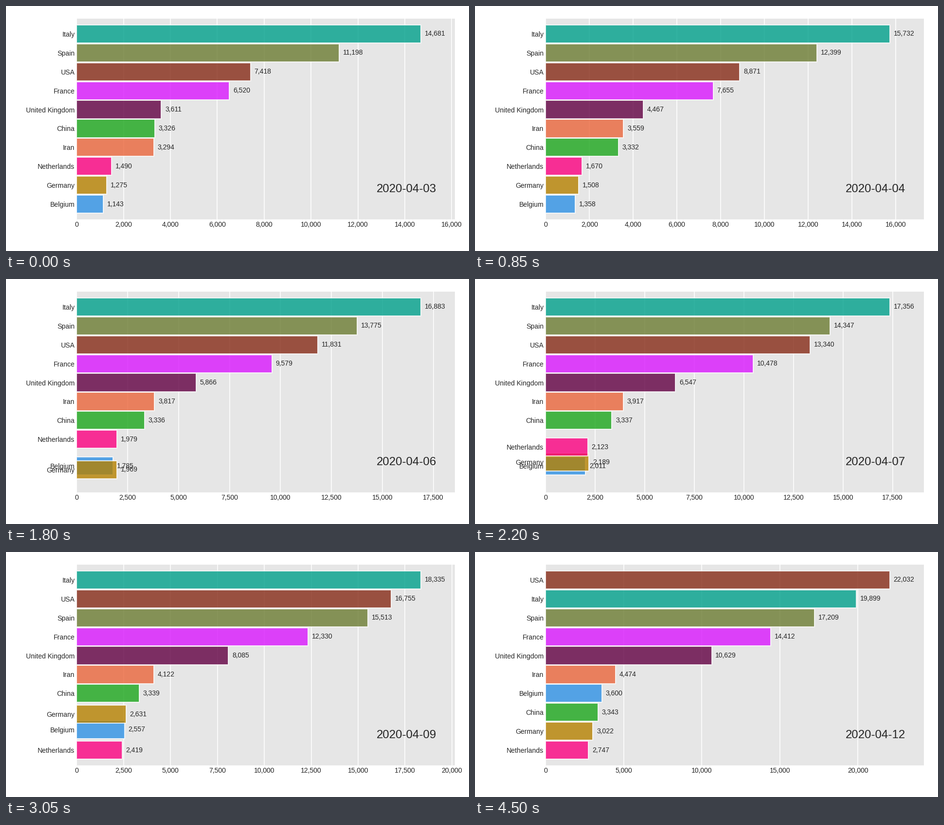
Animation of 952 by 504 pixels, one loop 4.55 s. Source, as a matplotlib script:

```python
import numpy as np
import matplotlib.pyplot as plt
from matplotlib.animation import FuncAnimation
from matplotlib.ticker import StrMethodFormatter

W, H, DPI = 952, 504, 144
LEFT, RIGHT, TOP, BOTTOM = 145.29, 923.45, 25.9, 439.1
STEPS, INTERVAL = 10, 50
DAYS, FIRST_DAY = 9, 3

# name: (colour, total every third day); listed in drawing order
KEY_DAYS = [0, 3, 6, 9]
COUNTRIES = {
    "Belgium": ("#2E91E5", [1143, 1632, 2523, 3600]),
    "China": ("#1CA71C", [3326, 3335, 3339, 3343]),
    "France": ("#DA16FF", [6520, 8926, 12228, 14412]),
    "Germany": ("#B68100", [1275, 1810, 2607, 3022]),
    "Iran": ("#EB663B", [3294, 3739, 4110, 4474]),
    "Italy": ("#00A08B", [14681, 16523, 18279, 19899]),
    "Netherlands": ("#FC0080", [1490, 1874, 2403, 2747]),
    "Spain": ("#6C7C32", [11198, 13341, 15447, 17209]),
    "USA": ("#862A16", [7418, 10783, 16553, 22032]),
    "United Kingdom": ("#620042", [3611, 5385, 7993, 10629]),
}

# (day on which the swap starts, riser, faller); each takes one day
OVERTAKES = [
    (0, "Iran", "China"),
    (3, "Belgium", "Germany"),
    (4, "Germany", "Belgium"),
    (4, "Germany", "Netherlands"),
    (5, "Belgium", "Netherlands"),
    (5, "USA", "Spain"),
    (6, "Belgium", "Germany"),
    (7, "Belgium", "China"),
    (7, "USA", "Italy"),
]

names = list(COUNTRIES)
colors = [color for color, _ in COUNTRIES.values()]
keys = np.array([totals for _, totals in COUNTRIES.values()])
n_bars = len(names)

# Each total follows the cubic through its key points
curves = np.polyfit(KEY_DAYS, keys.T, 3)
start_places = keys[:, 0].argsort().argsort() + 1.0


def lengths_at(day):
    return np.polyval(curves, day)


def places_at(day):
    places = start_places.copy()
    for start, riser, faller in OVERTAKES:
        progress = np.clip(day - start, 0, 1)
        places[names.index(riser)] += progress
        places[names.index(faller)] -= progress
    return places


plt.rcParams.update({
    "font.family": "Liberation Sans",
    "text.color": "#262626",
    "xtick.color": "#262626",
    "ytick.color": "#262626",
})

fig = plt.figure(figsize=(W / DPI, H / DPI), dpi=DPI, facecolor="white")
ax = fig.add_axes([LEFT / W, 1 - BOTTOM / H, (RIGHT - LEFT) / W, (BOTTOM - TOP) / H],
                  facecolor="0.9")
ax.spines[:].set_visible(False)
ax.tick_params(length=0, labelsize=7, pad=2)
ax.grid(True, axis="x", color="white", linewidth=0.8)
ax.set_axisbelow(True)
ax.xaxis.set_major_formatter(StrMethodFormatter("{x:,.0f}"))

bars = ax.barh(start_places, keys[:, 0], height=0.95, color=colors,
               edgecolor="white", linewidth=1, alpha=0.8)
labels = [ax.text(0, 0, "", size=7, ha="left", va="center") for _ in names]
date = ax.text(0.95, 0.15, "", size=12, ha="right", va="center", transform=ax.transAxes)


def draw(i):
    day = i / STEPS
    lengths, places = lengths_at(day), places_at(day)
    x_max = lengths.max() * 1.1
    for bar, label, length, place in zip(bars, labels, lengths, places):
        bar.set_width(length)
        bar.set_y(place - bar.get_height() / 2)
        label.set_position((length + 0.01 * x_max, place))
        label.set_text(f"{length:,.0f}")
    ax.set_yticks(places, names)
    ax.set_xlim(0, x_max)
    ax.set_ylim(0.2, n_bars + 0.8)
    date.set_text(f"2020-04-{FIRST_DAY + i // STEPS:02d}")
    return [*bars, *labels, date]


anim = FuncAnimation(fig, draw, frames=DAYS * STEPS + 1, interval=INTERVAL, repeat=True)
plt.show()
```
